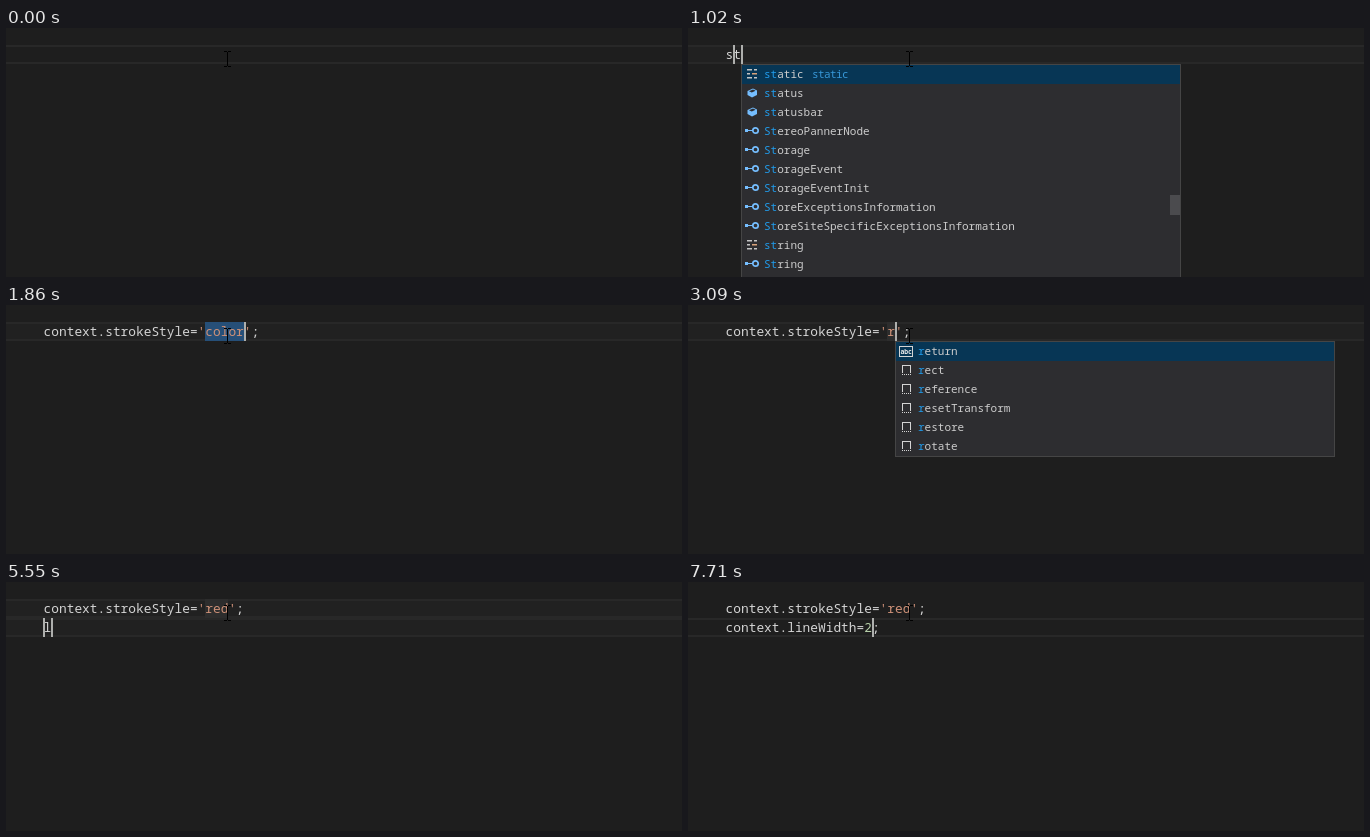
These frames come from a looping animation (676x249 px, 8 s). An HTML page with a canvas:

```html
<!DOCTYPE html>
<html lang="en">
<head>
<meta charset="utf-8">
<title>Editor completion</title>
<style>
html, body { margin: 0; width: 100%; height: 100%; overflow: hidden; background: #1e1e1e; }
canvas { display: block; }
</style>
</head>
<body>
<canvas id="stage" width="676" height="249"></canvas>
<script>
const g = document.getElementById('stage').getContext('2d');
const LOOP = 8000, LEFT = 37.6, TOP = 17, ROW = 19, CHAR = 7.7;
const FACE = '"Noto Sans Mono", "DejaVu Sans Mono", monospace';
const colX = col => Math.floor(LEFT + 0.3 + col * CHAR);

// Completion entries: icon kind, colon, label
const lists = {
  s: 'snip:save snip:scale prop:screen face:Screen prop:screenLeft prop:screenTop prop:screenX prop:screenY face:ScriptProcessorNode prop:scroll prop:scrollBy',
  st: 'key:static prop:status prop:statusbar face:StereoPannerNode face:Storage face:StorageEvent face:StorageEventInit face:StoreExceptionsInformation face:StoreSiteSpecificExceptionsInformation key:string face:String',
  str: 'snip:strokeStyle key:string face:String face:StringMap prop:stringify snip:stroke snip:strokeRect snip:strokeText',
  r: 'word:return snip:rect snip:reference snip:resetTransform snip:restore snip:rotate',
  re: 'word:return snip:rect snip:reference snip:resetTransform snip:restore',
  li: 'snip:lineWidth snip:lineCap snip:lineJoin'
};
const popup = (col, typed, extra) => ({
  col, typed, items: lists[typed].split(' ').map(s => s.split(':')), ...extra
});
const popS = popup(1, 's', { rows: 12, slider: true });
const popSt = popup(2, 'st', { rows: 12, slider: true, detail: 'static' });
const popStr = popup(3, 'str', { doc: 'strokeStyle of the context' });
const red = "context.strokeStyle='red';";
const mark = (row, col, len, color) => ({ row, col, len, color });
const STOP = '#2d2d2d', SELECT = '#264f78';

// Each step changes part of the state before it
const steps = [
  [0, { text: [''], row: 0, fill: false, oldRow: false, carets: [], marks: [], pop: null }],
  [170, { text: ['s'], fill: true, carets: [1] }],
  [320, { pop: popS }],
  [640, { carets: [] }],
  [940, { text: ['st'], carets: [1, 2] }],
  [1020, { pop: popSt }],
  [1170, { text: ['str'], carets: [1, 3] }],
  [1250, { pop: popStr }],
  [1630, { carets: [1] }],
  [1860, { text: ["context.strokeStyle='color';"], carets: [26], marks: [mark(0, 21, 5, SELECT)], pop: null }],
  [3090, { text: ["context.strokeStyle='r';"], carets: [22], marks: [mark(0, 21, 1, STOP)], pop: popup(22, 'r') }],
  [3170, { text: ["context.strokeStyle='re';"], carets: [23], marks: [mark(0, 21, 2, STOP)], pop: popup(23, 're') }],
  [3400, { text: [red], carets: [24], marks: [mark(0, 21, 3, STOP)], pop: null }],
  [3870, { carets: [] }],
  [4090, { row: 1, oldRow: true, carets: [0] }],
  [4470, { carets: [] }],
  [5550, { text: [red, 'l'], carets: [0, 1] }],
  [5700, { text: [red, 'li'], carets: [0, 2], pop: popup(2, 'li', { doc: 'lineWidth of the context' }) }],
  [6180, { carets: [0] }],
  [6560, { text: [red, 'context.lineWidth=width;'], fill: false, oldRow: false, carets: [23], pop: null,
           marks: [mark(1, 12, 5, '#343a40'), mark(1, 18, 5, SELECT)] }],
  [7710, { text: [red, 'context.lineWidth=2;'], carets: [19], marks: [] }]
];

function rect(x, y, w, h, color) {
  g.fillStyle = color;
  g.fillRect(x, y, w, h);
}

// Monospaced text on an exact character grid
function type(text, x, y, step, color) {
  g.fillStyle = color;
  for (const c of text) {
    g.fillText(c, x, y);
    x += step;
  }
  return x;
}

function code(text, y) {
  g.font = `12.83px ${FACE}`;
  let x = LEFT;
  for (const part of text.split(/('[^']*'|\d+)/)) {
    const color = part[0] === "'" ? '#ce9178' : /^\d/.test(part) ? '#b5cea8' : '#d4d4d4';
    x = type(part, x, y, CHAR, color);
  }
}

function band(row, fill) {
  const y = TOP + row * ROW;
  if (fill) rect(0, y, 676, ROW, '#212121');
  rect(0, y, 676, 2, '#282828');
  rect(0, y + ROW - 2, 676, 2, '#282828');
}

function shape(points, color) {
  g.fillStyle = color;
  g.beginPath();
  points.forEach(([x, y]) => g.lineTo(x, y));
  g.fill();
}

// Icons are drawn around their centre
const icons = {
  key() {
    for (const y of [-4, 0, 4]) {
      rect(-5, y - 1, y ? 5 : 3, 1.5, '#c5c5c5');
      rect(y ? 2 : 0, y - 1, y ? 3 : 5, 1.5, y ? '#c5c5c5' : '#d8a27a');
    }
  },
  prop() {
    shape([[-4.5, -2], [1, -4.5], [5, -2.5], [5, 2], [0, 4.5], [-4.5, 2]], '#75beff');
    shape([[-3, -1.8], [1, -3.4], [3.6, -2.2], [-0.2, -0.6]], '#2d2d30');
  },
  face() {
    rect(-7, -2, 3, 3, '#75beff');
    rect(-4, -1, 5, 1, '#75beff');
    g.strokeStyle = '#75beff';
    g.lineWidth = 1.7;
    g.beginPath();
    g.arc(3.5, -0.5, 2.7, 0, 7);
    g.stroke();
  },
  snip() {
    rect(-4, -5, 9, 1, '#d4d4d4');
    rect(-4, -5, 1, 8, '#d4d4d4');
    rect(4, -5, 1, 8, '#d4d4d4');
    for (let x = -4; x < 5; x += 2) rect(x, 4, 1, 1, '#d4d4d4');
  },
  word() {
    g.strokeStyle = '#d4d4d4';
    g.lineWidth = 1;
    g.strokeRect(-6.5, -4.5, 13, 10);
    g.font = `bold 6.5px ${FACE}`;
    type('abc', -5.5, 3, 3.8, '#e8e8e8');
  }
};

function drawPopup({ col, typed, items, rows = items.length, slider, detail, doc }) {
  const x = colX(col), y = TOP + ROW * (1) , h = rows * ROW + (doc ? 16 : 0) + 2;
  rect(x, y, 440, h, '#454545');
  rect(x + 1, y + 1, 438, h - 2, '#2d2d30');
  rect(x + 1, y + 1, 438, doc ? ROW + 16 : ROW, '#073655');
  let top = y + 1;
  // The list under the second line hangs over it, as the first one does
  items.forEach(([kind, label], i) => {
    g.save();
    g.translate(x + 11, top + 9);
    icons[kind]();
    g.restore();
    g.font = `11px ${FACE}`;
    const n = typed.length, base = top + 13;
    let end = type(label.slice(0, n), x + 23, base, 6.6, '#219bea');
    end = type(label.slice(n), end, base, 6.6, '#cccccc');
    if (!i && detail) type(detail, end + 8.5, base, 6, '#3796d6');
    if (!i && doc) type(doc, x + 23, base + 16, 6.6, '#a5b2bc');
    top += !i && doc ? ROW + 16 : ROW;
  });
  if (slider) rect(x + 429, y + 131, 10, 20, '#4b4b4e');
}

function pointer() {
  rect(221, 24, 1, 14, '#000');
  for (const y of [23, 38]) {
    rect(218, y, 3, 1, '#000');
    rect(222, y, 3, 1, '#000');
  }
}

function draw(time) {
  const s = {};
  for (const [at, change] of steps) if (at <= time) Object.assign(s, change);
  rect(0, 0, 676, 249, '#1e1e1e');
  if (s.oldRow) band(0, true);
  band(s.row, s.fill);
  for (const m of s.marks) {
    const x = colX(m.col);
    rect(x, TOP + m.row * ROW, colX(m.col + m.len) - x, ROW, m.color);
  }
  s.text.forEach((line, i) => code(line, TOP + 14 + i * ROW));
  for (const col of s.carets) rect(colX(col), TOP + s.row * ROW, 2, ROW, '#aeafad');
  if (s.pop) {
    g.save();
    // Only the short list opens on the second line, flush with its top
    drawPopup(s.pop);
    g.restore();
    if (s.row) {
      code(s.text[1], TOP + 14 + ROW);
    }
  }
  pointer();
}

const start = performance.now();
function tick() {
  draw((performance.now() - start) % LOOP);
  requestAnimationFrame(tick);
}
tick();
</script>
</body>
</html>
```
